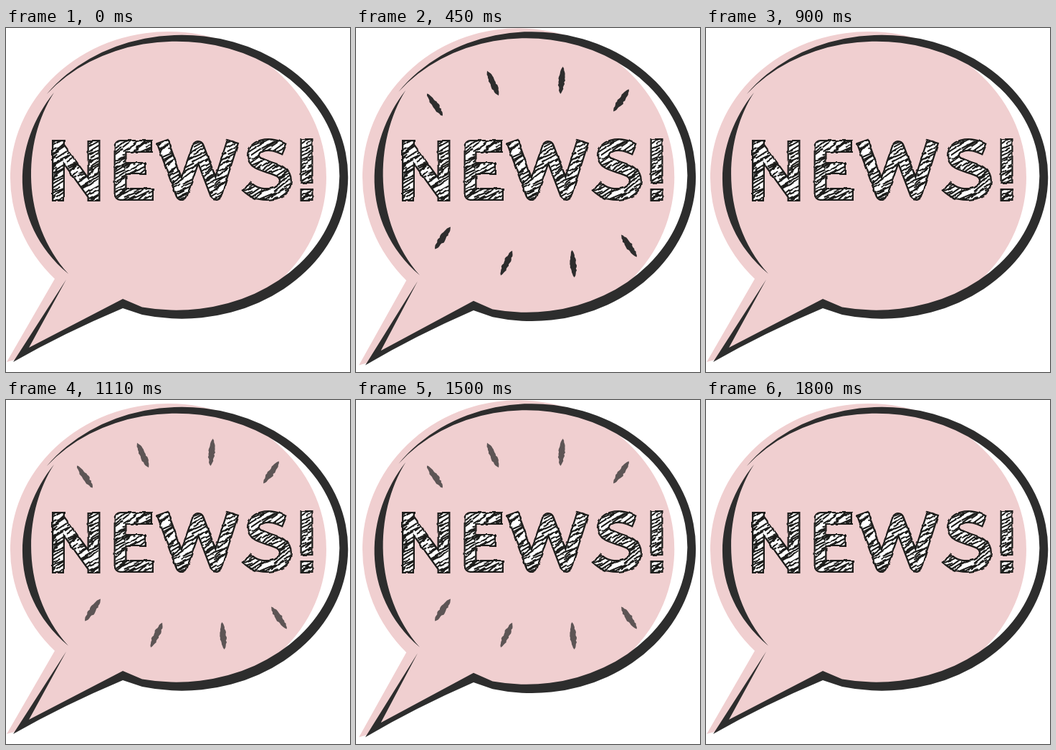
Write an HTML page that moves like this. It is 480 px wide and 480 px high and loops after 1.86 s.

```html
<!DOCTYPE html>
<html lang="en">
<head>
<meta charset="utf-8">
<title>News bubble</title>
<style>
html, body { margin: 0; width: 100%; height: 100%; overflow: hidden; background: #fff; }
svg { display: block; width: 100vw; height: 100vh; }
.ink { fill: #2d2d2d; }
.letters { fill: none; stroke-linecap: square; stroke-linejoin: round; }
</style>
</head>
<body>
<svg viewBox="0 0 480 480" role="img" aria-labelledby="label">
  <title id="label">NEWS!</title>
  <defs>
    <filter id="rough" x="-5%" y="-5%" width="110%" height="110%" color-interpolation-filters="sRGB">
      <feTurbulence type="fractalNoise" baseFrequency=".09" numOctaves="2" seed="4"/>
      <feDisplacementMap in="SourceGraphic" scale="3" xChannelSelector="R" yChannelSelector="G"/>
    </filter>
    <g id="letters" class="letters">
      <path d="M73,165V233 M122.5,165V233 M78,172L117,226"/>
      <path d="M195,165H159.5V232H197 M159.5,196H187"/>
      <path d="M221,166L245,232 268,166 293,232 314,166"/>
      <path d="M381,166C366,160 345,163 345,178C345,198 390,190 390,213C390,235 355,236 342,226"/>
      <path d="M419.5,163V208 M419.5,233v.1"/>
    </g>
    <mask id="inside" maskUnits="userSpaceOnUse" x="0" y="0" width="480" height="480">
      <use href="#letters" stroke="#fff" stroke-width="14"/>
    </mask>
  </defs>
  <g id="bubble">
    <path fill="#f0cfd0" d="M1,466L68,350A220.5,203.5 0 1 1 367.4,365Q320,398 245,400L163,385 12,463Z"/>
    <path class="ink" d="M57,92A232,198 0 1 1 190,400L163,391Q80,426 10,466L84,351 32,446 163,378 190,389.5A227.7,187.5 0 1 0 57,92Z"/>
    <path class="ink" d="M67,90C10,160 0,270 87,343C21,270 22,160 67,90Z"/>
  </g>
  <g filter="url(#rough)">
    <use href="#letters" stroke="#1c1c1a" stroke-width="18"/>
    <use href="#letters" stroke="#fff" stroke-width="13.4"/>
    <path id="hatch" mask="url(#inside)" fill="none" stroke="#1c1c1a" stroke-width="2.1"/>
  </g>
  <g id="dashes" class="ink"></g>
</svg>
<script>
const LOOP = 1860, STEP = 30, FADE = 120, BEAT = 450;
const $ = id => document.getElementById(id);
const clamp = v => Math.max(0, Math.min(1, v));

let seed = 7;
const rand = () => (seed = seed * 16807 % 2147483647) / 2147483647;
const jitter = size => (rand() * 2 - 1) * size;

// Short slanted pencil strokes over the whole word
function hatching() {
  let d = "";
  for (let x = 52; x < 432; x += 16) {
    for (let y = 152; y < 256; y += 5) {
      d += `M${x + jitter(3)},${y + jitter(1.5)}l${18 + jitter(4)},${-11 + jitter(3)}`;
    }
  }
  return d;
}

// Ragged upright brush mark, tapered at both ends
function brush(length, width) {
  const n = 16;
  const edge = side => Array.from({ length: n + 1 }, (_, i) => {
    const swell = Math.sin(Math.PI * i / n) ** 0.6;
    return `${side * swell * (width / 2 + jitter(1))},${length * (i / n - 0.5)}`;
  });
  return "M" + [...edge(1), ...edge(-1).reverse()].join(" ") + "Z";
}

function addDash([x, y], angle) {
  const path = document.createElementNS("http://www.w3.org/2000/svg", "path");
  path.setAttribute("d", brush(38, 8.5));
  path.setAttribute("transform", `translate(${x} ${y}) rotate(${angle})`);
  $("dashes").append(path);
}

$("hatch").setAttribute("d", hatching());

// Both rows lean by the same angles, mirrored
const leans = [-35, -25, 5, 35];
const above = [[110, 107], [191, 77], [287, 73], [370, 101]];
const below = [[121, 293], [210, 328], [303, 329], [381, 304]];
leans.forEach((lean, i) => {
  addDash(above[i], lean);
  addDash(below[i], -lean);
});

const ramp = (t, start) => clamp((t - start) / FADE);

function draw(ms) {
  const t = Math.floor(ms % LOOP / STEP) * STEP;
  const tall = Math.floor(t / BEAT) % 2 === 1;
  $("bubble").setAttribute("transform",
    tall ? "translate(239 238) scale(.987 1.02) translate(-239 -238)" : "");
  $("dashes").setAttribute("opacity", ramp(t, 0) - ramp(t, 450) + ramp(t, 1020) - ramp(t, 1470));
}

const start = performance.now();
function tick() {
  draw(performance.now() - start);
  requestAnimationFrame(tick);
}
tick();
</script>
</body>
</html>
```
